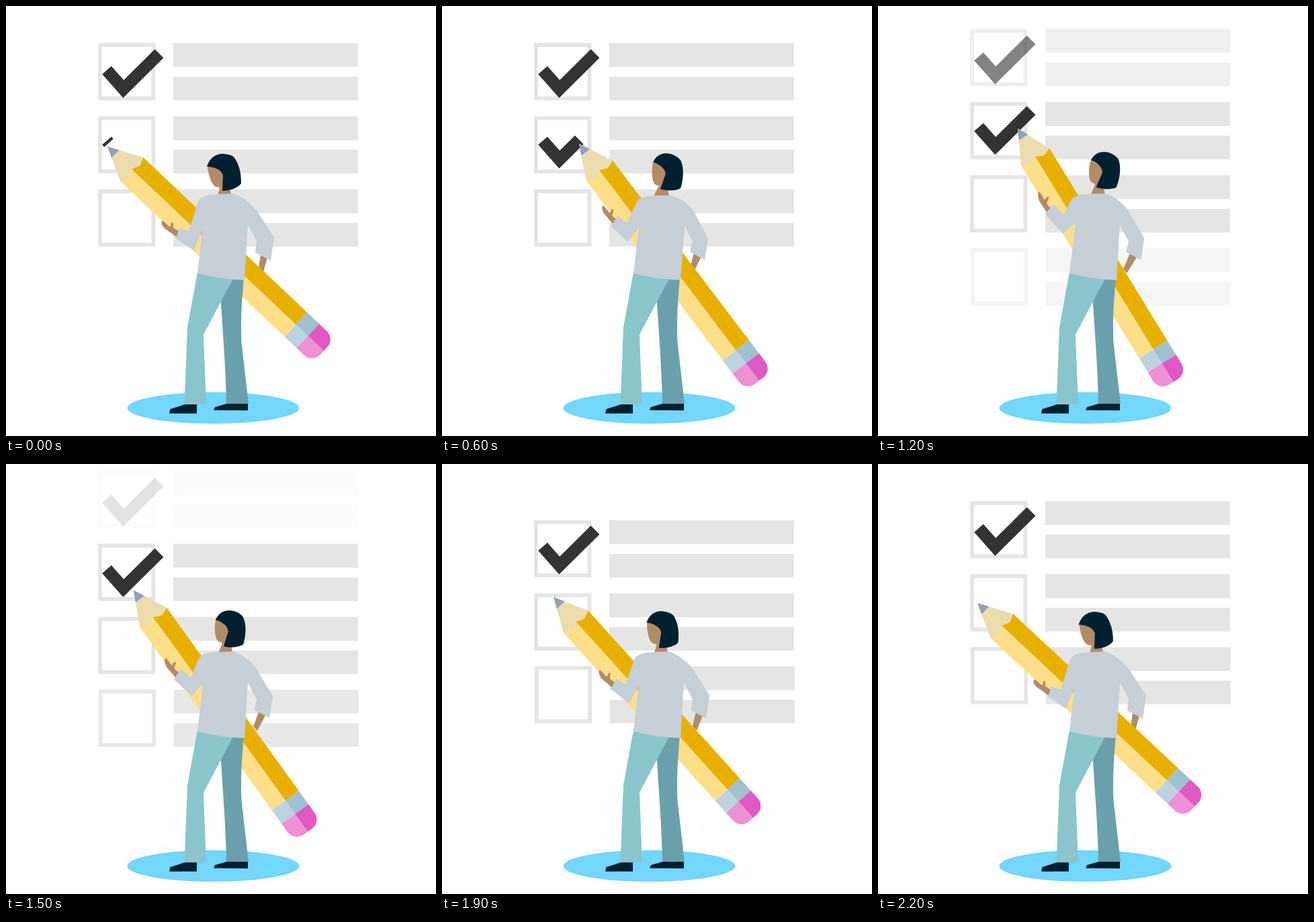
An HTML page for the animation above (2.3 s loop, 640x640 px).

```html
<!DOCTYPE html>
<html lang="en">
<head>
<meta charset="utf-8">
<title>Checklist</title>
<style>
html, body { margin: 0; width: 100%; height: 100%; overflow: hidden; background: #fff; }
svg { display: block; width: 100vw; height: 100vh; }
.tick { fill: none; stroke: #333; stroke-width: 18.3; }
</style>
</head>
<body>
<svg viewBox="0 0 640 640">
  <defs>
    <g id="row">
      <rect x="140" y="58" width="79.4" height="79.4" fill="none" stroke="#e5e5e5" stroke-width="5.8"/>
      <path d="M249 55.2H524V90.8H249ZM249 105.2H524V140.4H249Z" fill="#e5e5e5"/>
    </g>
    <path id="tick" d="M150 95.5L174.8 123.5L228 70.8"/>
  </defs>
  <g id="rows"></g>
  <use id="oldTick" class="tick" href="#tick"/>
  <use id="newTick" class="tick" href="#tick"/>
  <ellipse cx="308.5" cy="598.3" rx="128" ry="23.5" fill="#73d6fb"/>
  <path id="backHand" fill="#b28b67"/>
  <g id="pencil">
    <path d="M0 0L50 -24.7L58 -12V12L50 24.7Z" fill="#eadcad"/>
    <path d="M0 0L16 -8V8Z" fill="#909fba"/>
    <path d="M50 -24.7H386V0H49.5L55 -12Z" fill="#e7b000"/>
    <path d="M49.5 0H386V24.7H50L55.5 11.5Z" fill="#fddf8a"/>
    <path d="M386 -24.7H410.5V0H386Z" fill="#a0c1cf"/>
    <path d="M386 0H410.5V24.7H386Z" fill="#bcd3df"/>
    <path d="M410.5 -24.7H426A17 17 0 0 1 443 -7.7V0H410.5Z" fill="#e058c4"/>
    <path d="M410.5 0H443V7.7A17 17 0 0 1 426 24.7H410.5Z" fill="#ee90d5"/>
  </g>
  <path d="M338 400L354.500 400C351 435 349 470 350.500 500L361 592H328C327 540 323 490 319.500 435Z" fill="#6aa0ac"/>
  <path d="M285 396L270 478L265.500 593H298L294 489L338 406Z" fill="#8ac5cc"/>
  <path d="M244.500 600L266 593H284V606.500H243ZM311 597L328 592H360V602L309 601.500Z" fill="#001f30"/>
  <path id="hand" fill="#b28b67"/>
  <path id="face" fill="#b28b67"/>
  <path id="shirt" fill="#c6ced6"/>
  <path id="hair" fill="#001f30"/>
</svg>
<script>
const LOOP = 2300, STEP = 100, PITCH = 108.9;
const $ = id => document.getElementById(id);

// Each part has three poses: starting the tick, past its corner, finishing it.
const poses = {
  backHand: [
    'M379 370L389 375L383 396L376 390Z',
    'M375 368L386 374L378 396L372 391Z',
    'M375 367L385 373L369 398L364 391Z'],
  hand: [
    'M232 320Q234 320 235 321L243 328Q246 329 246 323Q247 321 249 323L249 330L260 337L257 346L236 331Q230 325 232 320Z',
    'M239 314Q240 313 242 316L249 323Q251 326 253 318Q254 316 256 318L255 327L263 332L257 339L242 324Q236 317 239 314Z',
    'M240 272Q242 271 243 274L247 282Q248 286 252 280Q254 278 255 281L251 290L258 298L252 305L241 287Q237 276 240 272Z'],
  face: [
    'M300 238C301 252 306 266 312 269Q316 270 318 270L315 283L336 283L333 272L323 240Z',
    'M311 235C309 250 312 264 316 268Q319 270 322 270L313 286L338 286L336 274L331 240Z',
    'M319 228C314 238 314 258 318 261Q321 264 324 264L316 283L338 283L337 271L335 240Z'],
  shirt: [
    'M290 286C300 279 320 280 338 279C350 283 364 293 374 306L399 344L394 379L371 367L373 350L360 325L355 408Q318 407 285 398L292 333L280 364L253 346L258 330L272 335L286 291Q288 287 290 286Z',
    'M294 290C304 282 322 284 340 284C354 285 368 294 376 306L396 347L391 378L369 366L373 351L362 328L355 408Q318 407 285 398L292 335L277 361L254 342L261 327L274 333L290 297Q291 292 294 290Z',
    'M290 286C300 278 320 280 337 279C351 282 366 294 374 307L396 346L391 378L369 366L373 350L360 326L355 408Q318 407 285 398L294 322L275 336L248 306L262 291L277 308L287 290Q288 287 290 286Z'],
  hair: [
    'M299 239C303 225 314 219 324 220C332 221 337 222 340 226C348 238 350 250 350 264C345 271 334 275 322 275L323 252C321 244 310 239 299 239Z',
    'M311 235C316 224 324 220 333 221C344 222 351 228 353 232C358 242 358 260 355 272C349 276 338 277 325 275L331 252C331 244 322 239 311 235Z',
    'M319 228C324 219 332 216 340 217C350 218 357 224 360 229C364 240 361 258 355 271C348 273 336 274 325 269L335 248C336 238 326 232 319 228Z']
};

// time, tip x, tip y, angle
const pencilKeys = [
  [0, 151, 209, 43.4], [300, 177, 229, 45.6], [400, 187, 218, 48],
  [600, 204, 205, 52.8], [900, 218, 184, 60.15], [1000, 219.5, 178.5, 61.1],
  [1200, 208, 182, 58.5], [1500, 190, 188, 54.2], [1900, 166, 198, 47.9],
  [2200, 148, 207, 43.1], [2300, 151, 209, 43.4]
];
// time, list offset
const scrollKeys = [[0, 0], [940, 0], [1200, 21], [1500, 45.4], [1900, 80.4], [2200, PITCH], [2300, PITCH]];

function at(keys, t) {
  const i = Math.max(1, keys.findIndex(k => k[0] >= t));
  const a = keys[i - 1], b = keys[i], f = (t - a[0]) / (b[0] - a[0]);
  return a.slice(1).map((v, j) => v + (b[j + 1] - v) * f);
}

function blend(paths, weights) {
  const nums = paths.map(p => p.match(/\d+/g));
  let i = 0;
  return paths[0].replace(/\d+/g, () => {
    const v = weights.reduce((sum, w, k) => sum + w * nums[k][i], 0);
    i++;
    return v.toFixed(2);
  });
}

function poseWeights(t, angle) {
  if (t < 300) {
    const k = t / 300;
    return [1 - k, 1.2 * k, -0.2 * k];
  }
  if (t < 900) {
    const b = (900 - t) / 500;
    return [0, b, 1 - b];
  }
  const a = (60.15 - angle) / 16.75;
  return [a, 0, 1 - a];
}

const rows = [0, 1, 2, 3].map(() => {
  const use = document.createElementNS('http://www.w3.org/2000/svg', 'use');
  use.setAttribute('href', '#row');
  return $('rows').appendChild(use);
});

const clamp = v => Math.min(1, Math.max(0, v));
const move = (el, x, y) => el.setAttribute('transform', `translate(${x} ${y})`);

function draw(t) {
  const [scroll] = at(scrollKeys, t);
  const [x, y, angle] = at(pencilKeys, t);
  const fade = clamp((t - 945) / 640);

  rows.forEach((row, i) => move(row, i == 3 ? 0.7 : 0, i * PITCH - scroll - (i == 3 ? 0.6 : 0)));
  rows[0].setAttribute('opacity', 1 - fade);
  rows[3].setAttribute('opacity', fade);

  const tickScroll = scroll * 105 / PITCH;
  move($('oldTick'), 0, -tickScroll);
  move($('newTick'), 0, 105 - tickScroll);
  $('oldTick').setAttribute('opacity', 1 - fade);
  $('newTick').setAttribute('stroke-dasharray', `${4.5 + 0.124 * t} 400`);

  $('pencil').setAttribute('transform', `translate(${x} ${y}) rotate(${angle})`);
  const weights = poseWeights(t, angle);
  for (const id in poses) $(id).setAttribute('d', blend(poses[id], weights));
}

const start = performance.now();
function tick() {
  const t = (performance.now() - start) % LOOP;
  draw(Math.floor(t / STEP) * STEP);
  requestAnimationFrame(tick);
}
tick();
</script>
</body>
</html>
```
